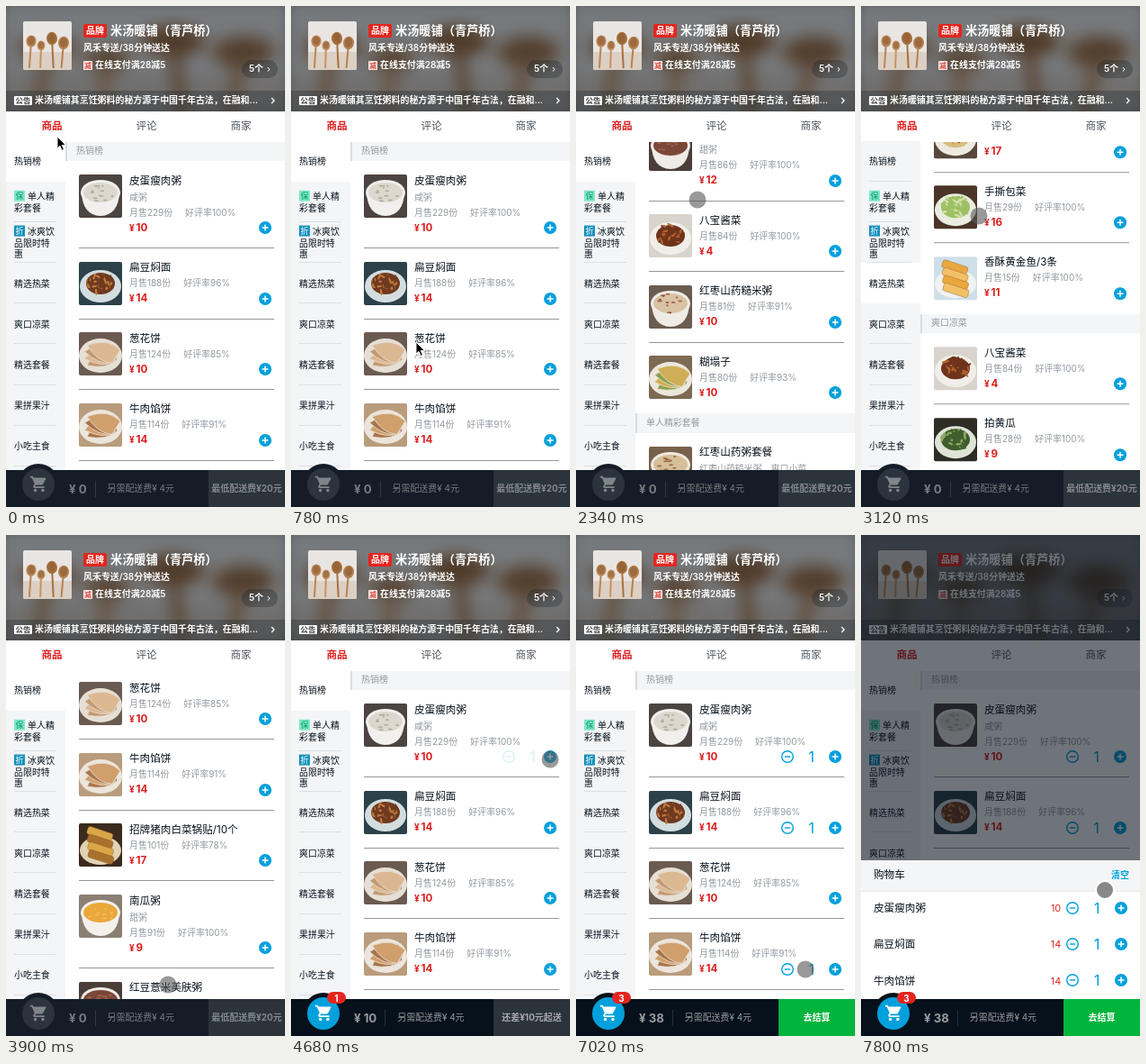
Recreate the animation shown at these times as an HTML page. Size 310x556 px, loop 8000 ms.

```html
<!DOCTYPE html>
<html lang="zh-CN">
<head>
<meta charset="utf-8">
<title>点餐</title>
<style>
html, body { margin: 0; width: 100%; height: 100%; overflow: hidden; background: #fff; }
#stage { position: relative; width: 310px; height: 556px; overflow: hidden; color: #07111b;
  font: 9.95px/1 Inter, "Noto Sans CJK SC", "Noto Sans CJK", sans-serif; }
#stage div, #stage svg { position: absolute; }
#stage .t { white-space: nowrap; transform: translateY(-50%); }
#stage .mid { transform: translate(-50%, -50%); }
.b { font-weight: 700; }
.m { font-weight: 600; }
.white { color: #fff; }
.gray { color: #93999f; }
.red { color: #dc1f1f; }
.blue { color: #00a0dc; }
.big { font-size: 11.6px; }

#header { width: 310px; height: 117px; overflow: hidden; background: #77706a; }
#backdrop { left: -8px; top: -8px; width: 326px; height: 133px; filter: blur(9px); }
.tint { inset: 0; background: rgba(7,17,27,.5); }
.notice { top: 94px; width: 310px; height: 23px; background: rgba(7,17,27,.25); }
.tag { display: flex; align-items: center; justify-content: center; border-radius: 2px; }

#menu { top: 149.5px; width: 66px; height: 367px; overflow: hidden; background: #f3f5f7; }
.row { left: 0; width: 66px; height: 45.2px; }
.row.on { background: #fff; }
.row p { position: absolute; left: 9px; width: 47px; top: 50%; margin: 0; transform: translateY(-50%);
  line-height: 12.3px; font-weight: 300; }
.row::after { content: ""; position: absolute; left: 9px; width: 47px; bottom: 0; height: 1px; background: #dde0e3; }
.row.on::after { display: none; }
.row i { display: inline-block; width: 12px; height: 12px; margin-right: 3px; font: 500 9px/12px Inter, "Noto Sans CJK SC", sans-serif;
  text-align: center; vertical-align: top; }

#list { left: 66px; top: 150.5px; width: 244px; height: 366px; overflow: hidden; }
#content { left: -66px; top: 0; width: 310px; }
.title { left: 66px; width: 242px; height: 21.5px; border-left: 2px solid #d9dde1; background: #f3f5f7; }
.rule { left: 81px; width: 217px; height: 1px; background: #94989c; }
.pic { left: 81px; width: 48px; height: 48px; border-radius: 2px; }
.count { font-size: 16.5px; }

#shade { inset: 0; background: rgba(7,17,27,.58); }
#panel { top: 361px; width: 310px; height: 156px; background: #fff; }
#bar { top: 515px; width: 310px; height: 41px; background: #141d27; color: rgba(255,255,255,.42); }
#bar.active { background: #07111b; color: rgba(255,255,255,.58); }
#ring { left: 13px; top: -7px; width: 46px; height: 46px; border-radius: 50%; background: inherit; }
#disc { left: 18px; top: -2px; width: 36px; height: 36px; border-radius: 50%; background: #2b343c; color: #80858a; }
.active #disc { background: #00a0dc; color: #fff; }
#badge { left: 40px; top: -8px; width: 21px; height: 13px; border-radius: 7px; background: #e5251d; font-size: 10px; }
#sum { left: 70px; top: 12px; height: 18px; display: flex; align-items: center; white-space: nowrap; }
#total { font-size: 13.2px; font-weight: 700; padding-right: 9px; line-height: 18px; border-right: 1px solid rgba(255,255,255,.12); margin-right: 13px; }
#pay { left: 225px; width: 85px; height: 41px; border-radius: 0; background: #2b333b; }
#pay.ready { background: #00b43c; color: #fff; }
</style>
</head>
<body>
<div id="stage"></div>
<script>
const menu = [
  ['热销榜'], ['单人精彩套餐', '保', '#7fe8c6', '#079a6c'], ['冰爽饮品限时特惠', '折', '#1591bd', '#fff'],
  ['精选热菜'], ['爽口凉菜'], ['精选套餐'], ['果拼果汁'], ['小吃主食']
];

// name, sold, rating, price, [kind, backdrop, plate, food, accent], description
const groups = [
  ['热销榜', [
    ['皮蛋瘦肉粥', 229, 100, 10, ['bowl', '#4b4440', '#f1f0ee', '#ddd8ce', '#a39d90'], '咸粥'],
    ['扁豆焖面', 188, 96, 14, ['pile', '#2c4149', '#d3dde0', '#6f3a20', '#c07a3c']],
    ['葱花饼', 124, 85, 10, ['slices', '#6a5a50', '#e6dfd6', '#dcb892', '#c49a70']],
    ['牛肉馅饼', 114, 91, 14, ['slices', '#b89c7c', '#ece5dc', '#cf9f6c', '#a9744a']],
    ['招牌猪肉白菜锅贴/10个', 101, 78, 17, ['sticks', '#3b2b1e', '#e2d3b4', '#d9a648', '#a9712c']],
    ['南瓜粥', 91, 100, 9, ['bowl', '#8b7f74', '#f4f1ec', '#eaa83a', '#f3c162'], '甜粥'],
    ['红豆薏米美肤粥', 86, 100, 12, ['bowl', '#4b3e39', '#efebe6', '#7b4738', '#a9705a'], '甜粥'],
    ['八宝酱菜', 84, 100, 4, ['pile', '#d8d3cc', '#f1eee9', '#6f331c', '#b4632f']],
    ['红枣山药糙米粥', 81, 91, 10, ['bowl', '#6b5c50', '#efece6', '#d8c3a4', '#8a3c2a']],
    ['糊塌子', 80, 93, 10, ['slices', '#7d6a52', '#ece7dd', '#cfae55', '#8da04c']]
  ]],
  ['单人精彩套餐', [['红枣山药粥套餐', 17, 100, 29, ['bowl', '#77614c', '#efe9df', '#d6bf98', '#8a4a30'], '红枣山药糙米粥，爽口小菜']]],
  ['冰爽饮品限时特惠', [['VC无限橙果汁', 15, 100, 8, ['bowl', '#c9d3cd', '#f3efe4', '#f0a020', '#f7c455']]]],
  ['精选热菜', [
    ['娃娃菜炖豆腐', 43, 92, 17, ['pile', '#58483a', '#eeeae0', '#d6be7c', '#a7402c']],
    ['手撕包菜', 29, 100, 16, ['pile', '#4a3526', '#e9ecdf', '#9dc064', '#d3e2a8']],
    ['香酥黄金鱼/3条', 15, 100, 11, ['sticks', '#cfdfe8', '#f0f2f0', '#e9a73e', '#f3c068']]
  ]],
  ['爽口凉菜', [
    ['八宝酱菜', 84, 100, 4, ['pile', '#d8d3cc', '#f1eee9', '#6f331c', '#b4632f']],
    ['拍黄瓜', 28, 100, 9, ['pile', '#2d2c25', '#dfe3d6', '#3f5f2c', '#93a968']]
  ]]
];
const hot = groups[0][1];
const orders = [0, 1, 3];

const box = (cls, style, html = '') => `<div class="${cls}" style="${style}">${html}</div>`;
const text = (x, y, str, cls = '', style = '') => box('t ' + cls, `left:${x}px;top:${y}px;${style}`, str);
const svg = (attrs, w, h, body) => `<svg ${attrs} viewBox="0 0 ${w} ${h}">${body}</svg>`;
const oval = (x, y, rx, ry, fill, extra = '') => `<ellipse cx="${x}" cy="${y}" rx="${rx}" ry="${ry}" fill="${fill}" ${extra}/>`;
const icon = (x, y, body) => svg(`width="16" height="16" style="left:${x - 8}px;top:${y - 8}px"`, 16, 16, body);
const plus = (x, y) => icon(x, y, '<circle cx="8" cy="8" r="7" fill="#00a0dc"/><path d="M4.5 8h7M8 4.5v7" stroke="#fff" stroke-width="1.5"/>');
const minus = (x, y) => icon(x, y, '<circle cx="8" cy="8" r="6.3" fill="none" stroke="#00a0dc" stroke-width="1.4"/><path d="M4.8 8h6.4" stroke="#00a0dc" stroke-width="1.4"/>');
const amount = (x, y) => text(x, y, 1, 'mid blue count');

function randomizer(seed) {
  let s = seed * 7919 + 17;
  return () => (s = s * 16807 % 2147483647) / 2147483647;
}

const scatter = (rnd, count, draw) => Array.from({ length: count }, (_, i) => {
  const a = rnd() * 6.28, r = Math.sqrt(rnd());
  return draw(24 + 15 * r * Math.cos(a), 23 + 11 * r * Math.sin(a), i);
}).join('');

const fillings = {
  bowl: (plate, food, accent, rnd) =>
    `<path d="M3 20q1 25 21 26q20-1 21-26z" fill="${plate}"/>` + oval(24, 20, 22, 14, plate) + oval(24, 20, 19, 11, food) +
    scatter(rnd, 12, (x, y) => oval(x, y - 3, 1 + rnd() * 2, 1, accent, 'opacity=".7"')),
  pile: (plate, food, accent, rnd) =>
    oval(24, 27, 23, 18, plate) + oval(24, 24, 16, 12, food) +
    scatter(rnd, 44, (x, y, i) => oval(x, y, 2 + rnd() * 3, 1.2, i % 3 ? food : accent, `transform="rotate(${rnd() * 180} ${x} ${y})"`)),
  slices: (plate, food, accent) =>
    oval(24, 26, 24, 19, plate) + [-24, -8, 8, 22].map((lean, i) =>
      `<path d="M6 ${30 - i * 3}q18-17 36-9l-3 17q-15 5-33-8z" fill="${i % 2 ? food : accent}" stroke="${plate}" stroke-width=".7" transform="rotate(${lean} 24 26)"/>`).join(''),
  sticks: (plate, food, accent) =>
    oval(24, 30, 23, 16, plate) + [0, 1, 2, 3].map(i =>
      `<rect x="${5 + i * 3}" y="${8 + i * 8}" width="29" height="9" rx="3" fill="${i % 2 ? accent : food}" stroke="#8a5a20" stroke-opacity=".4" transform="rotate(18 24 24)"/>`).join('')
};

const dish = ([kind, back, ...colors], seed, y) =>
  svg(`class="pic" style="top:${y}px;background:${back}"`, 48, 48, fillings[kind](...colors, randomizer(seed)));

function spoons(attrs) {
  const spoon = (x, y, r, lean, color) =>
    `<g transform="rotate(${lean} ${x} ${y})"><path d="M${x} ${y}V52" stroke="${color}" stroke-width="2"/>` +
    oval(x, y, r, r * 1.2, color) + oval(x, y - .5, r * .72, r * .9, '#8d5c33', 'opacity=".6"') + '</g>';
  return svg(attrs + ' preserveAspectRatio="none"', 54, 54,
    '<rect width="54" height="54" fill="#e9e5e2"/><rect y="34" width="54" height="20" fill="#dccfc3"/>' +
    spoon(9, 22, 5.5, 4, '#b98655') + spoon(20, 27, 4.5, 2, '#c59362') +
    spoon(32, 19, 6, -3, '#a8713f') + spoon(45, 24, 6, 5, '#b58150'));
}

const header = () => `<div id="header">${spoons('id="backdrop"')}` + box('tint', '') +
  spoons('style="left:19px;top:17px;width:54px;height:54px;border-radius:2px"') +
  box('tag b white', 'left:86px;top:20px;width:26px;height:15px;background:#e5251d', '品牌') +
  text(116, 28, '米汤暖铺（青芦桥）', 'b white', 'font-size:13.2px') +
  text(86, 47, '风禾专送/38分钟送达', 'm white') +
  box('tag b', 'left:86px;top:61px;width:10px;height:10px;background:#fbeae8;color:#d9463c;font-size:8px;border-radius:1px', '减') +
  text(99, 66, '在线支付满28减5', 'm white') +
  box('', 'left:262px;top:60px;width:40px;height:20px;border-radius:10px;background:rgba(7,17,27,.25)') +
  text(270, 70, '5个', 'm white') + text(290, 69.5, '›', 'white') +
  box('notice', '') +
  box('tag b', 'left:9px;top:100px;width:20px;height:10px;background:#fff;color:#444;font-size:8.5px;border-radius:1px', '公告') +
  text(32, 105, '米汤暖铺其烹饪粥料的秘方源于中国千年古法，在融和...', 'm white') +
  svg('width="6" height="8" style="left:294px;top:101px"', 6, 8, '<path d="M1 1l3 3-3 3" fill="none" stroke="#fff" stroke-width="1.3"/>') +
  '</div>' +
  text(51, 134, '商品', 'mid big b red') +
  text(156, 134, '评论', 'mid big', 'color:#4d555d') +
  text(261, 134, '商家', 'mid big', 'color:#4d555d');

const foodTop = {};
function foodList() {
  let y = 0, html = '', seed = 1;
  for (const [group, foods] of groups) {
    html += box('title', `top:${y}px`) + text(78, y + 10.7, group, 'gray');
    y += 21.5;
    foods.forEach(([name, sold, rating, price, look, desc], i) => {
      const top = y + 15, shift = desc ? 18 : 0, line = top + 41 + shift;
      foodTop[name] = top;
      html += dish(look, seed++, top) + text(137, top + 7.5, name, 'big');
      if (desc) html += text(137, top + 25.5, desc, 'gray');
      html += text(137, top + 24.5 + shift, `月售${sold}份<span style="margin-left:14px">好评率${rating}%</span>`, 'gray') +
        text(137, line + .5, '¥', 'b red') + text(144.5, line + .5, price, 'big b red') + plus(288, line);
      if (group === '热销榜' && orders.includes(i))
        html += box('control', '', minus(235, line) + amount(261.5, line));
      if (i < foods.length - 1) html += box('rule', `top:${top + 63 + shift}px`);
      y += 78.6 + shift;
    });
  }
  return html;
}

const menuRows = () => menu.map(([name, tag, back, color], i) =>
  box('row', `top:${i * 45.2}px`, `<p>${tag ? `<i style="background:${back};color:${color}">${tag}</i>` : ''}${name}</p>`)).join('');

const panelRows = () => orders.map((id, i) => {
  const y = 54 + i * 40.3;
  return text(14, y, hot[id][0], 'big') + text(216.5, y, hot[id][3], 'mid red', 'font-size:10.8px') +
    minus(235, y - 1.5) + amount(262, y - 1.5) + plus(289, y - 1.5);
}).join('');

const cart = svg('width="21" height="21" style="left:7.5px;top:7px"', 24, 24,
  `<g fill="currentColor"><circle cx="7.5" cy="20" r="2"/><circle cx="17" cy="20" r="2"/>
  <path d="M1 2h3.3l1 2H20.500q1 .3.4 1.500l-3.600 6.500q-.6 1-1.700 1H8.100l-1.100 2H19v2H6.500q-2.500-.5-1.300-3l1.400-2.400L3 4H1z"/></g>`);

const stage = document.getElementById('stage');
stage.innerHTML = header() +
  `<div id="menu">${menuRows()}</div>
  <div id="list"><div id="content">${foodList()}</div></div>
  <div id="shade"></div>
  <div id="panel">
    ${box('', 'width:310px;height:34px;background:#f3f5f7;border-bottom:1px solid #e9ebed')}
    ${text(14, 17, '购物车', 'big')}${text(278, 17, '清空', 'm blue')}${panelRows()}
  </div>
  <div id="bar">
    <div id="ring"></div>
    <div id="disc">${cart}</div>
    <div id="badge" class="tag b white"></div>
    <div id="sum"><span id="total"></span><span>另需配送费¥ 4元</span></div>
    <div id="pay" class="tag b"></div>
  </div>
  <svg id="pointer" width="310" height="556" viewBox="0 0 310 556" style="left:0;top:0"></svg>`;

const arrow = '<path d="M0 0v13l3-2.7 2.2 5 2.2-1-2.2-4.9h4.2z" fill="#000" stroke="#fff" stroke-width=".9"/>';
const pointers = {
  arrow,
  ring: `<circle r="21.5" fill="none" stroke="#111" stroke-width="1.6"/>${arrow}`,
  dot: '<circle r="9.5" fill="#555" fill-opacity=".6"/>',
  halo: '<circle r="10" fill="#888" stroke="#fff" stroke-width="2"/>'
};

// scroll, menu row, items in cart, just added, pointer, x, y, panel open
const steps = [
  [0, 0, 0, 0, 'arrow', 57, 145, 0],
  [0, 0, 0, 0, 'arrow', 139, 373, 0],
  [189, 0, 0, 0, 'ring', 139.5, 374, 0],
  [560, 0, 0, 0, 'dot', 135, 215, 0],
  [foodTop['手撕包菜'] - 49, 3, 0, 0, 'dot', 131, 233, 0],
  [199, 0, 0, 0, 'dot', 180, 499, 0],
  [0, 0, 1, 1, 'dot', 288, 249, 0],
  [0, 0, 2, 1, 'dot', 288, 328, 0],
  [0, 0, 3, 1, 'dot', 288, 485, 0],
  [0, 0, 3, 0, 'dot', 255, 482, 0],
  [0, 0, 3, 0, 'halo', 271, 394, 1]
];
const stepTime = 780, loopTime = 8000, minimum = 20;

const $ = id => document.getElementById(id);
const rows = stage.querySelectorAll('.row');
const controls = stage.querySelectorAll('.control');

function show([scroll, row, items, fresh, kind, x, y, open]) {
  const total = orders.slice(0, items).reduce((sum, id) => sum + hot[id][3], 0);
  $('content').style.transform = `translateY(${-scroll}px)`;
  rows.forEach((el, i) => el.classList.toggle('on', i === row));
  controls.forEach((el, i) => {
    const entering = fresh && i === items - 1;
    el.style.opacity = i >= items ? 0 : entering ? .15 : 1;
    el.style.transform = entering ? 'translateX(7px)' : '';
  });
  $('bar').className = items ? 'active' : '';
  $('badge').style.display = items ? '' : 'none';
  $('badge').textContent = items;
  $('total').textContent = '¥ ' + total;
  $('pay').classList.toggle('ready', total >= minimum);
  $('pay').textContent = !total ? `最低配送费¥${minimum}元` : total < minimum ? `还差¥${minimum - total}元起送` : '去结算';
  $('shade').style.display = $('panel').style.display = open ? '' : 'none';
  $('pointer').innerHTML = `<g transform="translate(${x} ${y})">${pointers[kind]}</g>`;
}

const start = performance.now();
let shown = -1;
function tick() {
  const step = Math.floor((performance.now() - start) % loopTime / stepTime);
  if (step !== shown) show(steps[shown = step]);
  requestAnimationFrame(tick);
}
tick();
</script>
</body>
</html>
```
